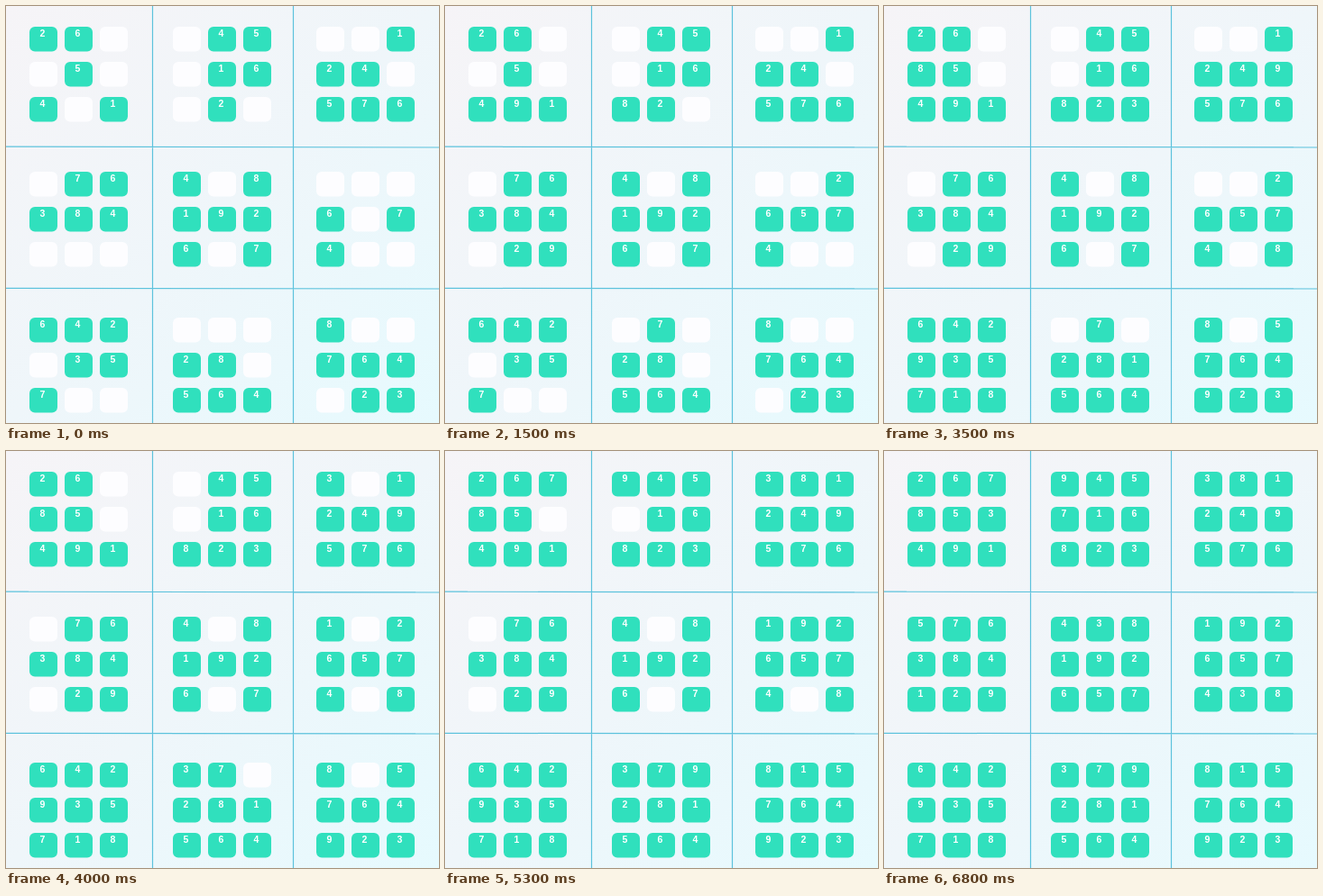
Animation, 480 px wide and 463 px high, one loop 7200 ms. Source, as an HTML page:

```html
<!DOCTYPE html>
<html lang="en">
<head>
<meta charset="utf-8">
<title>Number grid filling in</title>
<style>
  html, body { margin: 0; width: 100%; height: 100%; overflow: hidden; }
  svg { display: block; width: 100%; height: 100%; }
  text { font: bold 10.5px "Liberation Sans", Arial, sans-serif; fill: #fff; text-anchor: middle; }
  .blank { fill: #fdfdff; }
  .filled { fill: #30e0bd; }
  .line { stroke: #5cc2dc; stroke-width: 1.2; }
</style>
</head>
<body>
<svg id="stage" viewBox="0 0 480 463">
  <defs>
    <linearGradient id="sky" x1="0" y1="0" x2="1" y2="1">
      <stop offset="0" stop-color="#f6f4f7"/>
      <stop offset=".5" stop-color="#eff6fa"/>
      <stop offset="1" stop-color="#e6fafe"/>
    </linearGradient>
  </defs>
  <rect width="480" height="463" fill="url(#sky)"/>
  <path class="line" d="M162.5 0V463M318.5 0V463M0 156.2L480 157M0 313.3L480 314"/>
</svg>
<script>
const LOOP = 7200, STEP = 200;
const stage = document.getElementById('stage');
const solution = [
  '267945381', '853716249', '491823576',
  '576438192', '384192657', '129657438',
  '642379815', '935281764', '718564923'
];
// Cells in filling order, each written as row and column.
const order = ('58 75 34 32 63 49 62 92 79 21 93 81 29 36 69 86 97 ' +
  '47 17 74 18 48 76 78 13 14 68 41 24 23 61 45 65').split(' ');
// Steps that come slightly ahead of the regular beat.
const early = new Set(['93', '81', '29']);

const place = (index, starts) => starts[Math.floor(index / 3)] + index % 3 * 39;

function add(parent, tag, attributes) {
  const node = document.createElementNS(stage.namespaceURI, tag);
  for (const name in attributes) node.setAttribute(name, attributes[name]);
  return parent.appendChild(node);
}

function addTile(parent, x, y, kind) {
  add(parent, 'rect', { x, y, width: 31, height: 27.5, rx: 6, class: kind });
}

const pending = [];
solution.forEach((digits, row) => [...digits].forEach((digit, col) => {
  const x = place(col, [26, 185, 344]);
  const y = place(row, [23, 184, 346]);
  const key = `${row + 1}${col + 1}`;
  const turn = order.indexOf(key);
  if (turn >= 0) addTile(stage, x, y, 'blank');
  const group = add(stage, 'g', {});
  addTile(group, x, y, 'filled');
  add(group, 'text', { x: x + 14.5, y: y + 11 }).textContent = digit;
  if (turn >= 0) {
    const time = (turn + 1) * STEP - (early.has(key) ? 100 : 0);
    pending.push({ group, time });
  }
}));

const start = performance.now();
function draw(now) {
  const time = Math.max(0, now - start) % LOOP;
  for (const cell of pending) {
    cell.group.style.visibility = time >= cell.time ? 'visible' : 'hidden';
  }
  requestAnimationFrame(draw);
}
draw(start);
</script>
</body>
</html>
```
